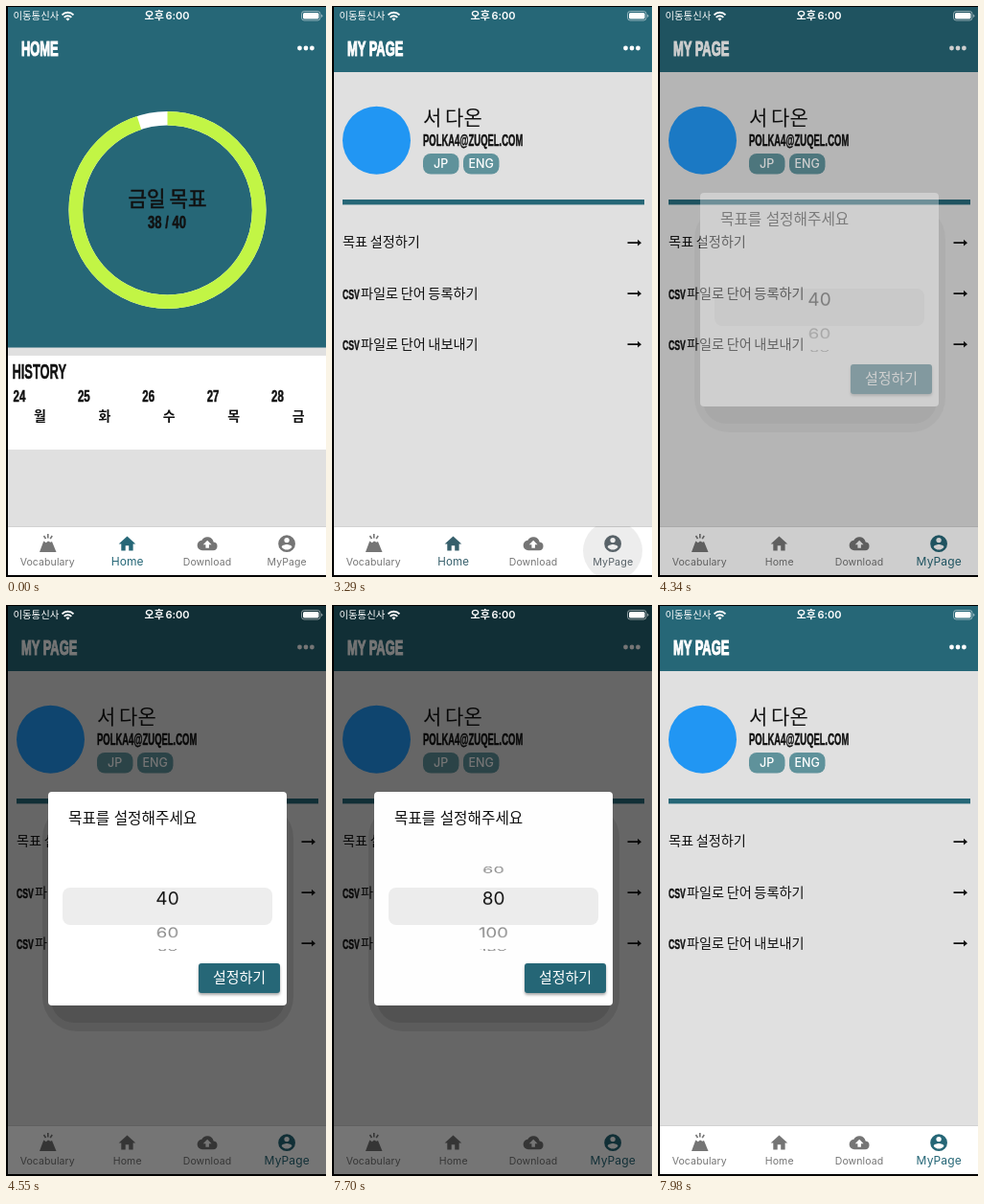
Write an HTML page that moves like this. It is 334x596 px and loops after 8000 ms.

```html
<!DOCTYPE html>
<html lang="ko">
<head>
<meta charset="utf-8">
<title>Vocabulary goal</title>
<style>
  :root { --teal: #266777; --grey: #757575; --loop: 8s linear infinite; }
  html, body { margin: 0; width: 100%; height: 100%; overflow: hidden; background: #000; }
  #stage { position: relative; width: 334px; height: 596px; overflow: hidden; background: #000; }
  #stage > * { position: absolute; left: 0; top: 0; }
  svg, #modal { width: 334px; height: 596px; }
  svg { display: block; }
  text, #modal { font-family: "Noto Sans CJK KR", "Noto Sans CJK", sans-serif; }
  text { word-spacing: -.1em; }
  .latin { font-family: Inter, Roboto, sans-serif; }
  .narrow { font-family: "Liberation Sans", Arial, sans-serif; font-weight: bold; word-spacing: 0;
    stroke: #111; stroke-width: .5px; }
  .title { font-size: 21.5px; fill: #fff; stroke: #fff; stroke-width: 1.2px; }
  .mid { text-anchor: middle; }

  /* pages and tabs */
  #mypage { animation: page var(--loop); }
  @keyframes page { 0%, 41.124% { visibility: hidden } 41.125%, 100% { visibility: visible } }
  .tab { fill: var(--grey); }
  .tab text { font: 10.5px Inter, Roboto, sans-serif; text-anchor: middle; letter-spacing: .1px;
    transform-box: fill-box; transform-origin: 50% 100%; }
  .leave { animation: leave var(--loop); }
  .leave text { animation: shrink var(--loop); }
  .enter { animation: enter var(--loop); }
  .enter text { animation: grow var(--loop); }
  @keyframes leave { 0%, 41.124% { fill: var(--teal) } 41.125% { fill: #365f6b } 43.75%, 100% { fill: var(--grey) } }
  @keyframes shrink { 0%, 41.124% { transform: scale(1.143) } 41.125% { transform: scale(1.1) } 43.75%, 100% { transform: none } }
  @keyframes enter { 0%, 41.124% { fill: var(--grey) } 41.125% { fill: #586268 } 43.75%, 100% { fill: var(--teal) } }
  @keyframes grow { 0%, 41.124% { transform: none } 41.125% { transform: scale(1.02) } 43.75%, 100% { transform: scale(1.143) } }
  #ripple { opacity: 0; animation: ripple var(--loop); }
  @keyframes ripple { 0%, 41.124% { opacity: 0 } 41.125% { opacity: .07 } 43.75%, 100% { opacity: 0 } }

  /* the barrier and the dialog fade together, each on its own layer */
  #barrier, #modal { opacity: 0; animation: dialog var(--loop); }
  @keyframes dialog {
    0%, 54.249% { opacity: 0 } 54.25% { opacity: .35 } 55.125% { opacity: .8 } 56% { opacity: .96 }
    56.875%, 96.25% { opacity: 1 } 97.125% { opacity: .82 } 98% { opacity: .48 } 98.875% { opacity: .17 }
    99.75%, 100% { opacity: 0 }
  }
  #modal > * { position: absolute; box-sizing: border-box; }
  #stage > #barrier { left: 2px; top: 1px; right: 0; bottom: 2px; background: rgba(0,0,0,.54); }
  .shade { background: rgba(0,0,0,.1); }
  #shade1 { left: 38px; top: 207px; width: 262px; height: 238px; border-radius: 36px; }
  #shade2 { left: 47px; top: 216px; width: 244px; height: 220px; border-radius: 24px; }
  #card { left: 44px; top: 195px; width: 249px; height: 223px; border-radius: 4px; background: #fff; }
  #prompt { left: 65px; top: 210px; font-size: 15.7px; line-height: 24px; white-space: nowrap; color: #111; }
  #apply { left: 201px; top: 374px; width: 85px; height: 31px; border-radius: 3px; background: var(--teal);
    color: #fff; font-size: 15px; line-height: 28px; text-align: center; box-shadow: 0 2px 3px rgba(0,0,0,.35); }

  /* number wheel: a faded copy, covered in the middle by the band with a dark copy */
  .window { left: 59px; width: 219px; overflow: hidden; perspective: 333px; }
  #faded { top: 266px; height: 97px; }
  #faded .wheel { --ink: rgba(0,0,0,.46); }
  #band { top: 295px; height: 39px; border-radius: 8px; background: #ededed; }
  .wheel { --ink: #111; position: absolute; left: 0; top: 50%; width: 100%; height: 0;
    transform-style: preserve-3d; animation: spin var(--loop); }
  .wheel span { position: absolute; left: 0; top: -14px; width: 100%; text-align: center; color: var(--ink);
    font: 19px/28px Inter, Roboto, sans-serif; backface-visibility: hidden;
    transform: rotateX(calc(var(--i) * -42deg)) translateZ(52px); }
  @keyframes spin {
    0%, 69.125% { transform: translateZ(-52px) rotateX(9deg); animation-timing-function: ease-in-out }
    76.125%, 79.625% { transform: translateZ(-52px) rotateX(84deg); animation-timing-function: ease-out }
    84.875%, 100% { transform: translateZ(-52px) rotateX(93deg) }
  }
</style>
</head>
<body>
<div id="stage">
  <svg viewBox="0 0 334 596">
    <rect x="2" y="1" width="332" height="593" fill="#e0e0e0"/>
    <rect x="2" y="1" width="332" height="355.5" fill="var(--teal)"/>
    <text class="narrow title" transform="translate(16 51.5) scale(.6 1)">HOME</text>
    <g fill="none" stroke-width="14.6">
      <circle cx="168.5" cy="213" r="95.7" stroke="#fff"/>
      <circle cx="168.5" cy="213" r="95.7" stroke="#c2f545" pathLength="100" stroke-dasharray="95 5" transform="rotate(-90 168.5 213)"/>
    </g>
    <g fill="#111">
      <text class="mid" x="168.5" y="209" font-size="21.2" font-weight="500" stroke="#111" stroke-width=".5">금일 목표</text>
      <text class="narrow mid" transform="translate(168 232) scale(.74 1)" font-size="17.6">38 / 40</text>
      <rect x="2" y="365" width="332" height="98" fill="#fff"/>
      <text class="narrow" transform="translate(6.5 389) scale(.57 1)" font-size="22.6">HISTORY</text>
      <g id="days"></g>
    </g>
  </svg>

  <svg id="mypage" viewBox="0 0 334 596">
    <rect x="2" y="1" width="332" height="593" fill="#e0e0e0"/>
    <rect x="2" y="1" width="332" height="68" fill="var(--teal)"/>
    <text class="narrow title" transform="translate(16 51.5) scale(.6 1)">MY PAGE</text>
    <circle cx="46.5" cy="140.2" r="35.5" fill="#2196f3"/>
    <g fill="#111">
      <text x="95" y="124" font-size="21">서 다온</text>
      <text class="narrow" transform="translate(95 146.3) scale(.55 1)" font-size="17.2">POLKA4@ZUQEL.COM</text>
    </g>
    <g fill="#5f929b">
      <rect x="95" y="154" width="37.5" height="21.5" rx="8"/>
      <rect x="137" y="154" width="37.5" height="21.5" rx="8"/>
    </g>
    <g class="mid" fill="#fff" font-size="12.5" font-weight="500">
      <text class="latin" x="113.7" y="169.3">JP</text>
      <text class="latin" x="155.7" y="169.3">ENG</text>
    </g>
    <rect x="11" y="202" width="315" height="5.4" fill="var(--teal)"/>
    <g fill="#111" font-size="14.2">
      <text x="11" y="251.3">목표 설정하기</text>
      <text class="narrow" transform="translate(11 305.5) scale(.56 1)" font-size="15.4">CSV</text>
      <text x="30" y="304.8">파일로 단어 등록하기</text>
      <text class="narrow" transform="translate(11 358.5) scale(.56 1)" font-size="15.4">CSV</text>
      <text x="30" y="357.8">파일로 단어 내보내기</text>
      <path id="arrow" d="M308.500 246.300h10.500v-2.500l4 3.400-4 3.400v-2.500h-10.500z"/>
      <use href="#arrow" y="53"/>
      <use href="#arrow" y="106"/>
    </g>
  </svg>

  <svg viewBox="0 0 334 596">
    <g fill="#fff">
      <circle cx="306.5" cy="44" r="2.4"/><circle cx="313" cy="44" r="2.4"/><circle cx="319.4" cy="44" r="2.4"/>
    </g>
    <rect x="2" y="543" width="332" height="1" fill="#d2d2d2"/>
    <rect x="2" y="544" width="332" height="50" fill="#fff"/>
    <clipPath id="bar"><rect x="2" y="543" width="332" height="51"/></clipPath>
    <g clip-path="url(#bar)"><circle id="ripple" cx="293" cy="568.5" r="31"/></g>
    <g class="tab">
      <path d="M35 570l4.300-11.500 2.500 1.800 2.200-1.800 2.400 1.300 1.600-.8 4.500 11z"/>
      <path d="M43.800 551v4.500M39.500 553l2 3.200M48.200 553l-2 3.200" fill="none" stroke="#757575" stroke-width="1.600"/>
      <text x="43.2" y="584">Vocabulary</text>
    </g>
    <g class="tab leave">
      <path transform="translate(115.900 550.900) scale(.88)" d="M10 20v-6h4v6h5v-8h3L12 3 2 12h3v8z"/>
      <text x="126.7" y="584">Home</text>
    </g>
    <g class="tab">
      <path transform="translate(199.600 550.700) scale(.88)" d="M19.350 10.040A7.500 7.500 0 0 0 5.350 8.040A6 6 0 0 0 6 20h13a5 5 0 0 0 .35-9.960zM14 13v4h-4v-4H7l5-5 5 5z"/>
      <text x="210" y="584">Download</text>
    </g>
    <g class="tab enter">
      <path transform="translate(282.400 550.500) scale(.89)" fill-rule="evenodd" d="M2 12a10 10 0 1 0 20 0a10 10 0 1 0-20 0zM9 8a3 3 0 1 0 6 0a3 3 0 1 0-6 0zM12 19.200c-2.500 0-4.710-1.280-6-3.220.03-1.990 4-3.080 6-3.080 1.990 0 5.970 1.090 6 3.080-1.290 1.940-3.500 3.220-6 3.220z"/>
      <text x="293.2" y="584">MyPage</text>
    </g>
  </svg>

  <div id="barrier"></div>
  <div id="modal">
    <div id="shade1" class="shade"></div>
    <div id="shade2" class="shade"></div>
    <div id="card"></div>
    <div id="prompt">목표를 설정해주세요</div>
    <div id="faded" class="window"><div class="wheel"></div></div>
    <div id="band" class="window"><div class="wheel"></div></div>
    <div id="apply">설정하기</div>
  </div>

  <svg viewBox="0 0 334 596" fill="#fff">
    <text x="7.500" y="14.200" font-size="10.4">이동통신사</text>
    <path d="M58.500 9.300a8.500 8.500 0 0 1 12 0M60.700 11.800a5.400 5.400 0 0 1 7.600 0" fill="none" stroke="#fff" stroke-width="1.900"/>
    <path d="M64.500 15.500l-2-2.100a2.900 2.900 0 0 1 4 0z"/>
    <text class="mid" x="168" y="14.200" font-size="11" font-weight="600" style="font-family:Inter,'Noto Sans CJK KR',sans-serif">오후 6:00</text>
    <rect x="308.500" y="5.500" width="19.500" height="9.500" rx="2.800" fill="none" stroke="#fff" stroke-opacity=".5"/>
    <rect x="310" y="7" width="16.500" height="6.500" rx="1.600"/>
    <path d="M329.200 8.700a1.700 1.700 0 0 1 0 3.200z" fill-opacity=".6"/>
  </svg>
</div>
<script>
  const weekdays = [...'월화수목금'];
  document.getElementById('days').innerHTML = weekdays.map((day, i) => {
    const x = 7.5 + i * 67.4;
    return `<text class="narrow" transform="translate(${x} 413) scale(.72 1)" font-size="16">${24 + i}</text>
      <text class="mid" x="${x + 28}" y="433" font-size="14" font-weight="700">${day}</text>`;
  }).join('');

  const goals = [40, 60, 80, 100, 120];
  for (const wheel of document.querySelectorAll('.wheel')) {
    wheel.innerHTML = goals.map((goal, i) => `<span style="--i:${i}">${goal}</span>`).join('');
  }
</script>
</body>
</html>
```
